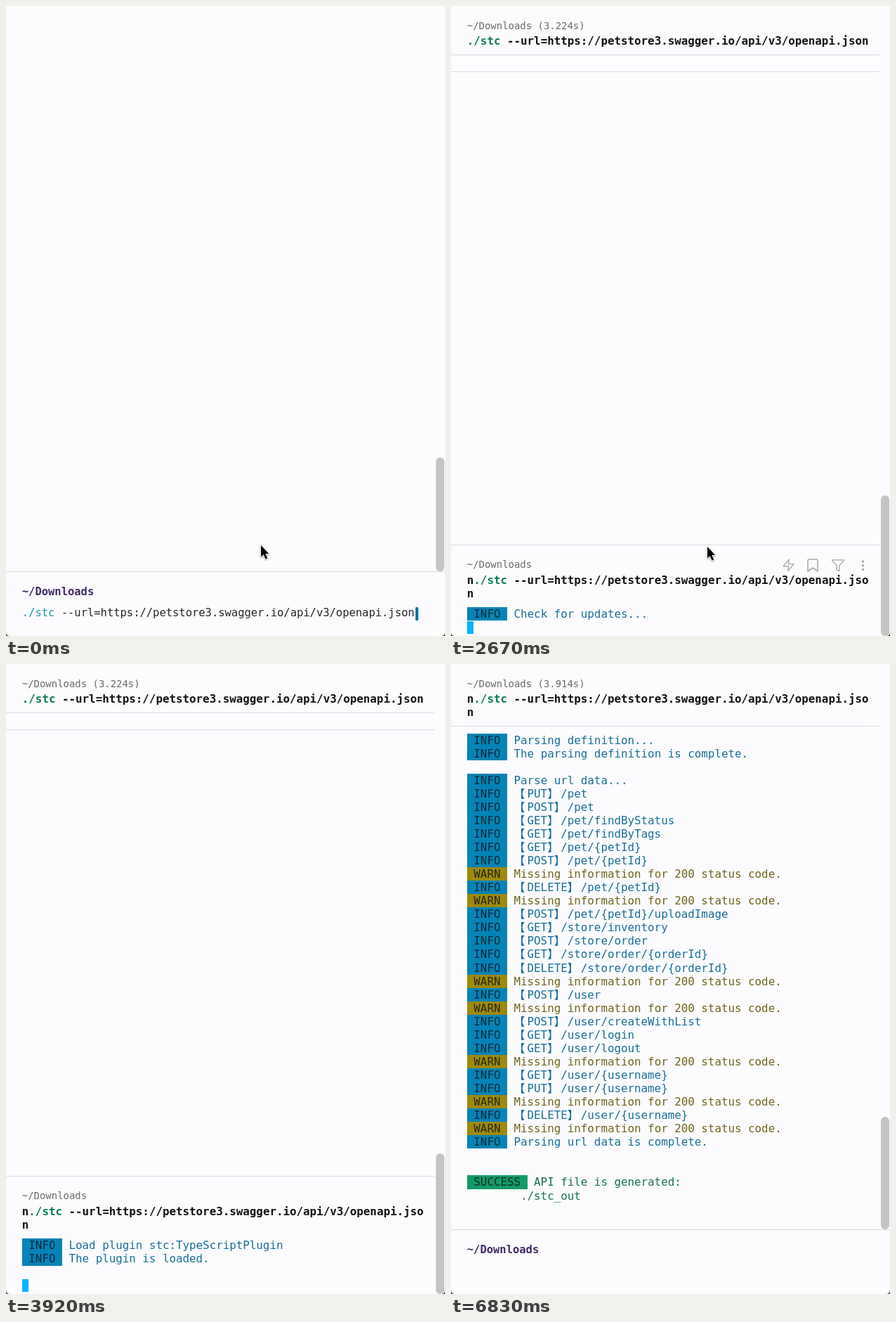
Write an HTML page that moves like this. It is 625 px wide and 896 px high and loops after 6.91 s.

```html
<!DOCTYPE html>
<html lang="en">
<head>
<meta charset="utf-8">
<title>Terminal session</title>
<style>
  html, body { margin: 0; width: 100%; height: 100%; overflow: hidden; background: #4b4c26; }
  #stage {
    position: relative; width: 625px; height: 896px; overflow: hidden;
    background: #fcfcfe; border-radius: 0 0 5px 5px;
    font: 15.83px/19.06px "DejaVu Sans Mono", monospace; color: #111;
  }
  #stage div, svg { position: absolute; }
  .row { left: 22.8px; height: 19.06px; white-space: pre; }
  .dir { font-size: 13.95px; color: #6b6966; }
  .cmd { font-weight: bold; }
  .cmd b { color: #0f7b57; }
  .rule { left: 0; width: 610px; height: 1px; background: #dad8e2; }
  .wide { width: 625px; background: #d8d8d8; }
  .prompt { font-size: 15.48px; color: #262626; }
  .prompt b { color: #3f2a63; }
  .prompt i { font-style: normal; color: #1b97a8; }
  .bar { width: 4px; height: 19px; top: 855px; background: #0e7398; border-radius: 1px; }
  .tag { display: inline-block; height: 19.06px; }
  .info { color: #176d99; }
  .warn { color: #6f6418; }
  .done { color: #16724e; }
  .info .tag { background: #0383b7; color: #0b2938; }
  .warn .tag { background: #9c8a0e; color: #2a2606; }
  .done .tag { background: #149a68; color: #0a2c1d; }
  .wideglyph {
    display: inline-block; width: 19.06px; line-height: 0;
    font-family: "Noto Sans CJK SC", "Noto Sans CJK JP", sans-serif;
  }
  #block { left: 22.8px; top: 874.5px; width: 9.5px; height: 18.5px; background: #06b4fc; }
  #thumb { left: 612px; width: 12px; background: #c4c4c4; border-radius: 6px; }
  #icons { left: 470px; top: 18px; fill: none; stroke: #aaa8a6; stroke-width: 1.6; stroke-linejoin: round; }
  #live { left: 0; top: 0; width: 625px; }
  #mouse { left: 0; top: 0; overflow: visible; }

  /* one shared clock, hard changes only */
  .t { animation: 6910ms step-end infinite; }
  #idle { animation-name: idle; }
  #run { animation-name: run; }
  #end { animation-name: end; }
  #live { animation-name: live; }
  #block { animation-name: block; }
  #thumb { animation-name: thumb; }
  #barA { left: 582.5px; animation-name: barA; }
  #barB { left: 22.5px; animation-name: barB; }
  #check { animation-name: check; }
  #load { animation-name: load; }
  #parse { animation-name: parse; }
  #icons { animation-name: icons; }
  .url { text-decoration: underline 1px transparent; text-underline-offset: 3px; animation-name: url; }
  #mouse { animation-name: move; }
  #arrow { animation-name: arrow; }
  #hand { animation-name: hand; }

  @keyframes idle { 0% { opacity: 1 } 21.707%, 100% { opacity: 0 } }
  @keyframes run { 0% { opacity: 0 } 21.707% { opacity: 1 } 77.134%, 100% { opacity: 0 } }
  @keyframes end { 0% { opacity: 0 } 77.134%, 100% { opacity: 1 } }
  @keyframes barA { 0%, 9.696% { opacity: 1 } 2.46%, 16.931%, 100% { opacity: 0 } }
  @keyframes barB { 0%, 91.606% { opacity: 1 } 84.37%, 98.842%, 100% { opacity: 0 } }
  @keyframes thumb {
    0% { top: 642px; height: 162px }
    21.707% { top: 696px; height: 200px }
    77.134%, 100% { top: 644px; height: 160px }
  }
  @keyframes live {
    0% { transform: translateY(785px) }
    24.167% { transform: translateY(766px) }
    55.426% { transform: translateY(728px) }
    75.976%, 100% { transform: translateY(709px) }
  }
  @keyframes block { 0% { opacity: 0 } 24.167%, 100% { opacity: 1 } }
  @keyframes check { 0% { opacity: 0 } 24.167% { opacity: 1 } 55.426%, 100% { opacity: 0 } }
  @keyframes load { 0% { opacity: 0 } 55.426%, 100% { opacity: 1 } }
  @keyframes parse { 0% { opacity: 0 } 75.976%, 100% { opacity: 1 } }
  @keyframes icons { 0% { opacity: 1 } 56.729%, 100% { opacity: 0 } }
  @keyframes url {
    0%, 48.19% { color: #111; text-decoration-color: transparent }
    43.415% { color: #3a68b0; text-decoration-color: #3a68b0 }
    100% { color: #111; text-decoration-color: transparent }
  }
  @keyframes move {
    0% { transform: translate(363px, 767px) }
    38.639% { transform: translate(365px, 769px) }
    39.797% { transform: translate(372px, 775px) }
    40.955% { transform: translate(385px, 784px) }
    42.257% { transform: translate(402px, 796px) }
    43.415% { transform: translate(420px, 807px) }
    44.573% { transform: translate(438px, 816px) }
    45.875% { transform: translate(452px, 822px) }
    47.033% { transform: translate(457px, 826px) }
    48.19% { transform: translate(460px, 833px) }
    53.111% { transform: translate(462px, 843px) }
    54.269% { transform: translate(466px, 858px) }
    55.426% { transform: translate(470px, 876px) }
    56.729% { transform: translate(700px, 950px) }
    86.83% { transform: translate(610px, 888px) }
    87.988%, 100% { transform: translate(700px, 950px) }
  }
  @keyframes arrow { 0%, 48.19%, 100% { opacity: 1 } 43.415% { opacity: 0 } }
  @keyframes hand { 0%, 48.19%, 100% { opacity: 0 } 43.415% { opacity: 1 } }
</style>
</head>
<body>
<div id="stage">
  <div id="idle" class="t">
    <div class="row prompt" style="top:853.9px"><i>./stc</i> --url=https://petstore3.swagger.io/api/v3/openapi.json</div>
    <div id="barA" class="bar t"></div>
  </div>

  <div id="run" class="t">
    <div class="row dir" style="top:18.6px">~/Downloads (3.224s)</div>
    <div class="row cmd" style="top:40.2px"><b>./stc</b> --url=https://petstore3.swagger.io/api/v3/openapi.json</div>
    <div class="rule" style="top:69px"></div>
    <div class="rule" style="top:93px"></div>
    <div id="live" class="t">
      <div class="rule" style="top:0"></div>
      <div class="row dir" style="top:19.4px">~/Downloads</div>
      <svg id="icons" class="t" width="130" height="24">
        <path transform="translate(.6 1.4) scale(.83)" d="M13 2 3 14h9l-1 8 10-12h-9l1-8z"/>
        <path transform="translate(33)" d="M19 20l-7-5-7 5V5a2 2 0 0 1 2-2h10a2 2 0 0 1 2 2z"/>
        <path transform="translate(70.4 1.2) scale(.88)" d="M22 3H2l8 9.46V19l4 2v-8.54z"/>
        <path d="M116.5 6v.01m0 5.7v.01m0 5.7v.01" stroke-width="3.4" stroke-linecap="round"/>
      </svg>
      <div class="row cmd" style="top:41.2px">n<b>./stc</b> --url=<span class="url t">https://petstore3.swagger.io/api/v3/openapi.jso</span></div>
      <div class="row cmd" style="top:60.2px"><span class="url t">n</span></div>
      <div id="check" class="t"></div>
      <div id="load" class="t"></div>
      <div id="parse" class="t"></div>
    </div>
    <div id="block" class="t"></div>
  </div>

  <div id="end" class="t">
    <div class="row dir" style="top:18.6px">~/Downloads (3.914s)</div>
    <div class="row cmd" style="top:40.2px">n<b>./stc</b> --url=https://petstore3.swagger.io/api/v3/openapi.jso</div>
    <div class="row cmd" style="top:59.2px">n</div>
    <div class="rule" style="top:88px"></div>
    <div id="log"></div>
    <div id="barB" class="bar t"></div>
  </div>

  <div id="idle2" class="prompt-area">
    <div id="foot"></div>
  </div>
  <div id="thumb" class="t"></div>
  <svg id="mouse" class="t" width="20" height="22">
    <path id="arrow" class="t" d="M0 0V16.4L3.7 13 6.5 19.6 9.2 18.4 6.4 12H11.2Z" stroke="#fff" stroke-width="1.4"
      paint-order="stroke" style="filter:drop-shadow(0 1px 1px #0006)"/>
    <g id="hand" class="t" transform="translate(-4 -1)" fill="#fff" stroke="#111" stroke-width="1.3" stroke-linejoin="round">
      <path d="M5.2 11.5 2.6 4.2Q2.2 1.8 4 1.6 5.6 1.5 6.3 3.4L8 8Q9.5 6.6 10.6 8 12.4 6.8 13.3 8.4 15.4 7.8 15.9 10L17 14.5Q17.4 17 16.3 19.5V20.8H8.6Q8 18.8 4.4 16.6 1 13.6 1.5 12.2 2.6 11 5.2 11.5Z"/>
      <path d="M8.8 13.2l.6 4.2M11.2 13l.5 4.2M13.6 12.8l.5 4.2" stroke-width="1"/>
    </g>
  </svg>
</div>
<script>
  const ROW = 19.06;
  const kinds = { I: ['info', ' INFO '], W: ['warn', ' WARN '], S: ['done', ' SUCCESS '] };
  const missing = 'W Missing information for 200 status code.';

  // First letter picks the tag; other rows are plain continuation text.
  function print(id, top, lines) {
    document.getElementById(id).innerHTML = lines.map((line, i) => {
      if (!line) return '';
      const [cls, tag] = kinds[line[0]] || ['done', ''];
      const text = (tag ? line.slice(1) : line)
        .replace(/[【】]/g, '<span class="wideglyph">$&</span>');
      const label = tag && `<span class="tag">${tag}</span>`;
      return `<div class="row ${cls}" style="top:${top + i * ROW}px">${label}${text}</div>`;
    }).join('');
  }

  const api = (verb, path) => `I 【${verb}】${path}`;
  const loaded = ['I Load plugin stc:TypeScriptPlugin', 'I The plugin is loaded.'];

  print('check', 89.4, ['I Check for updates...']);
  print('load', 89.4, loaded);
  print('parse', 89.4, ['', '', '', 'I Parsing definition...']);
  print('log', 98.5, [
    'I Parsing definition...',
    'I The parsing definition is complete.',
    '',
    'I Parse url data...',
    api('PUT', '/pet'),
    api('POST', '/pet'),
    api('GET', '/pet/findByStatus'),
    api('GET', '/pet/findByTags'),
    api('GET', '/pet/{petId}'),
    api('POST', '/pet/{petId}'),
    missing,
    api('DELETE', '/pet/{petId}'),
    missing,
    api('POST', '/pet/{petId}/uploadImage'),
    api('GET', '/store/inventory'),
    api('POST', '/store/order'),
    api('GET', '/store/order/{orderId}'),
    api('DELETE', '/store/order/{orderId}'),
    missing,
    api('POST', '/user'),
    missing,
    api('POST', '/user/createWithList'),
    api('GET', '/user/login'),
    api('GET', '/user/logout'),
    missing,
    api('GET', '/user/{username}'),
    api('PUT', '/user/{username}'),
    missing,
    api('DELETE', '/user/{username}'),
    missing,
    'I Parsing url data is complete.',
    '', '',
    'S API file is generated:',
    '        ./stc_out'
  ]);

  // The input panel looks the same before and after the run.
  for (const id of ['idle', 'end']) {
    document.getElementById(id).insertAdjacentHTML('beforeend',
      '<div class="rule wide" style="top:804px"></div>' +
      '<div class="row prompt" style="top:823.9px"><b>~/Downloads</b></div>');
  }
</script>
</body>
</html>
```
